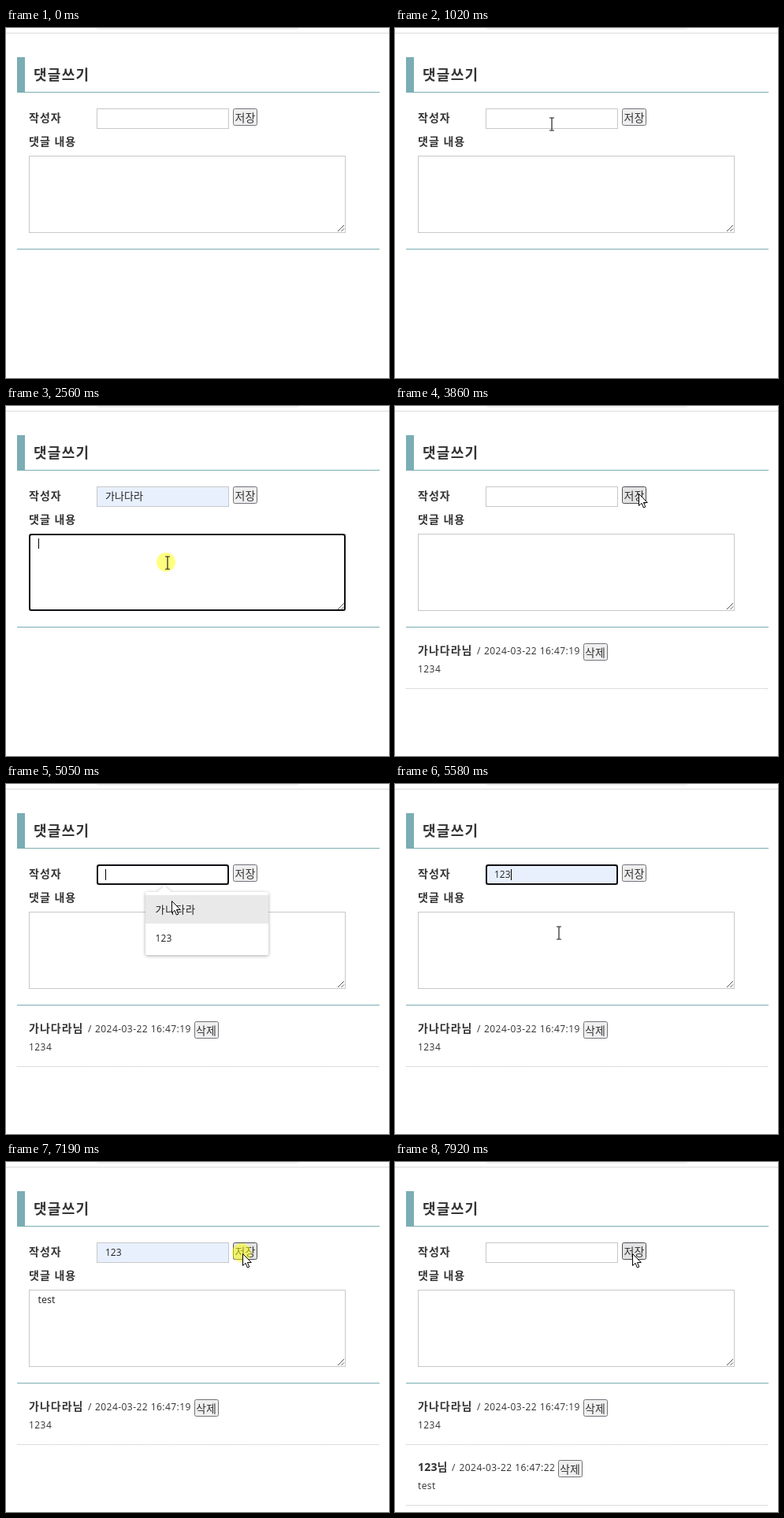
Recreate the animation shown at these times as an HTML page. Size 486 by 444 pixels, loop 8 s.

```html
<!DOCTYPE html>
<html lang="ko">
<head>
<meta charset="utf-8">
<style>
  html, body { margin: 0; width: 100%; height: 100%; overflow: hidden; background: #fff; }
  svg { display: block; }
  text { font: 13px "Open Sans", "Noto Sans CJK KR", "Noto Sans CJK", sans-serif; fill: #222; white-space: pre; }
  .title { font-size: 18px; font-weight: bold; letter-spacing: 1.3px; fill: #333; }
  .label { font-size: 14px; font-weight: bold; letter-spacing: 1px; fill: #333; }
  .small { font-size: 12px; letter-spacing: .45px; fill: #333; }
  .option { letter-spacing: .9px; }
  .num { font-size: 12px; letter-spacing: .1px; }
  .caption { font-size: 14px; fill: #333; }
  .button { fill: #efefef; stroke: #70737a; }
  .hover { fill: #e3e3e3; stroke: #4c4f56; }
  .field { fill: #fff; stroke: #c8c8c8; }
  .focus { fill: none; stroke: #101014; stroke-width: 2; }
  .line { fill: #7aadb4; }
  .popup { filter: drop-shadow(0 1px 2px #0005); }
</style>
</head>
<body>
<svg width="486" height="444" viewBox="0 0 486 444">
  <defs>
    <g id="rule"><path d="M14 358.5H474" stroke="#bbb" stroke-dasharray="1 1"/></g>
    <g id="grip"><path d="M421 258l8-8M425.500 258l3.500-3.500" stroke="#555" fill="none"/></g>
  </defs>
  <rect x="107" y="-28" width="273" height="30" rx="14" fill="#f0f1f2"/>
  <rect y="6" width="486" height="1" fill="#dcdcdc"/>
  <rect class="line" x="14" y="37" width="10" height="45"/>
  <rect class="line" x="14" y="81" width="460" height="1"/>
  <rect class="line" x="14" y="280" width="460" height="1"/>
  <text class="title" x="35" y="66">댓글쓰기</text>
  <text class="label" x="29" y="118.500">작성자</text>
  <text class="label" x="29" y="148.500">댓글 내용</text>

  <rect id="nameBox" class="field" x="115.500" y="102.500" width="167" height="25"/>
  <rect id="nameRing" class="focus" x="116" y="103" width="166" height="24" rx="2.500"/>
  <text id="name" x="126" y="118.500"></text>
  <rect id="nameCaret" y="108" width="1" height="14"/>
  <rect id="save" class="button" x="288.500" y="102.500" width="30" height="21" rx="2"/>
  <text class="caption" x="290.500" y="118.500">저장</text>

  <rect class="field" x="29.500" y="162.500" width="401" height="97"/>
  <rect id="bodyRing" class="focus" x="30" y="163" width="400" height="96" rx="2.500"/>
  <use href="#grip"/>
  <text id="body" x="40.500" y="179" style="font-size:12.500px"></text>
  <rect id="bodyCaret" y="168" width="1" height="13"/>

  <g id="post1">
    <text class="label" x="29" y="314.500">가나다라님</text>
    <text class="small" x="104" y="315">/</text>
    <text class="small" x="113" y="315">2024-03-22 16:47:19</text>
    <rect class="button" x="239.500" y="301.500" width="30" height="21" rx="2"/>
    <text class="caption" x="241" y="317.500">삭제</text>
    <text class="small" x="29" y="338">1234</text>
    <use href="#rule"/>
  </g>
  <g id="post2" transform="translate(0 77)">
    <text class="label" x="29" y="314.500" style="letter-spacing:.2px">123님</text>
    <text class="small" x="72" y="315">/</text>
    <text class="small" x="81.500" y="315">2024-03-22 16:47:22</text>
    <rect class="button" x="207.500" y="301.500" width="30" height="21" rx="2"/>
    <text class="caption" x="209" y="317.500">삭제</text>
    <text class="small" x="29" y="338">test</text>
    <use href="#rule"/>
  </g>

  <g id="popup">
    <path class="popup" fill="#fff" d="M179 137H192L201 129L210 137H331a2 2 0 0 1 2 2V215a2 2 0 0 1-2 2H179a2 2 0 0 1-2-2V139a2 2 0 0 1 2-2z"/>
    <rect id="pick" x="177" width="156" height="36" fill="#e8e9e8"/>
    <text class="option" x="189.500" y="163.500">가나다라</text>
    <text class="num" x="189.500" y="200">123</text>
  </g>

  <circle id="click" r="12" fill="#ff0" opacity=".5"/>
  <path id="arrow" d="M.5.5V15.500L4 12.300L6.400 18L8.800 17L6.400 11.500H11.300Z" fill="#fff" stroke="#000"/>
  <path id="beam" d="M-3-8H-.5L0-7.500L.5-8H3M0-7.500V7.500M-3 8H-.5L0 7.500L.5 8H3" fill="none" stroke="#222" stroke-width="1.200"/>
</svg>
<script>
const LOOP = 8000;
const $ = id => document.getElementById(id);
const show = (id, on) => $(id).setAttribute('visibility', on ? 'visible' : 'hidden');
const set = (id, key, v) => $(id).setAttribute(key, v);
const within = (t, ...spans) => spans.some(([a, b]) => t >= a && t < b);

// pointer stops: time, x, y
const path = [
  [470, 394, 411], [1020, 199, 122], [1500, 199, 122], [1620, 209, 147],
  [2030, 209, 148], [2360, 205, 199], [3130, 205, 199], [3530, 309, 111],
  [4270, 309, 111], [4390, 171, 115], [4850, 171, 115], [5050, 210, 148],
  [5120, 210, 148], [5320, 208, 189], [5560, 208, 189], [5790, 204, 197],
  [6580, 204, 197], [7060, 300, 116], [7900, 300, 116], [7920, 301, 116], [LOOP, 301, 116]
];

function pointer(t) {
  const i = Math.max(1, path.findIndex(p => p[0] > t));
  const [t0, x0, y0] = path[i - 1], [t1, x1, y1] = path[i];
  const u = Math.max(0, (t - t0) / (t1 - t0)), e = u * u * (3 - 2 * u);
  return [x0 + (x1 - x0) * e, y0 + (y1 - y0) * e];
}

// last value whose time has come
const latest = (t, steps) => steps.reduce((v, [at, next]) => t >= at ? next : v, '');
const typed = (t, word, times) => word.slice(0, times.filter(at => t >= at).length);
const inBox = (x, y, l, t, r, b) => x >= l && x < r && y >= t && y < b;

function field(id, text, focused, caretAtStart) {
  const el = $(id);
  if (el.textContent !== text) el.textContent = text;
  show(id + 'Ring', focused);
  show(id + 'Caret', focused);
  const left = +el.getAttribute('x');
  set(id + 'Caret', 'x', Math.round(left + (text && !caretAtStart ? el.getComputedTextLength() : 0)));
}

function render(t) {
  const [x, y] = pointer(t);
  const popup = within(t, [1150, 1960], [4720, 5520]);
  const preview = within(t, [1620, 1960], [5120, 5520]);
  const name = latest(t, [[1620, '가나다라'], [3860, ''], [5120, '가나다라'], [5320, '123'], [7450, '']]);
  const body = t < 3860
    ? typed(t, '1234', [2960, 3040, 3130, 3400])
    : t < 7450 ? typed(t, 'test', [6310, 6380, 6510, 6580]) : '';

  field('name', name, within(t, [1080, 2560], [4590, 5920]), preview);
  field('body', body, within(t, [2560, 3720], [5920, 7120]));
  $('name').style.letterSpacing = preview && name !== '123' ? '1.2px' : '0';
  $('name').style.fontSize = name === '123' ? '12px' : '13px';
  $('nameBox').style.fill = name ? '#e8f0fe' : '#fff';

  show('popup', popup);
  const row = y >= 177 ? 2 : y >= 141 ? 1 : 0;
  show('pick', popup && row);
  set('pick', 'y', row === 2 ? 177 : 141);
  show('post1', t >= 3860);
  show('post2', t >= 7450);

  const overSave = t >= 470 && inBox(x, y, 288, 102, 319, 124);
  set('save', 'class', overSave ? 'button hover' : 'button');

  const overText = !(popup && inBox(x, y, 177, 134, 333, 217)) &&
    (inBox(x, y, 115, 102, 283, 128) || inBox(x, y, 29, 162, 431, 260));
  const at = `translate(${Math.round(x)} ${Math.round(y)})`;
  set('arrow', 'transform', at);
  set('beam', 'transform', at);
  show('arrow', t >= 470 && !overText);
  show('beam', t >= 470 && overText);

  set('click', 'cx', x - (overText ? 2 : 1));
  set('click', 'cy', y - 1);
  show('click', within(t, [1080, 1280], [1890, 2030], [2560, 2690], [3720, 3860],
    [4590, 4850], [5450, 5560], [5920, 6050], [7120, 7260]));
}

function frame() {
  render(performance.now() % LOOP);
  requestAnimationFrame(frame);
}
frame();
</script>
</body>
</html>
```
